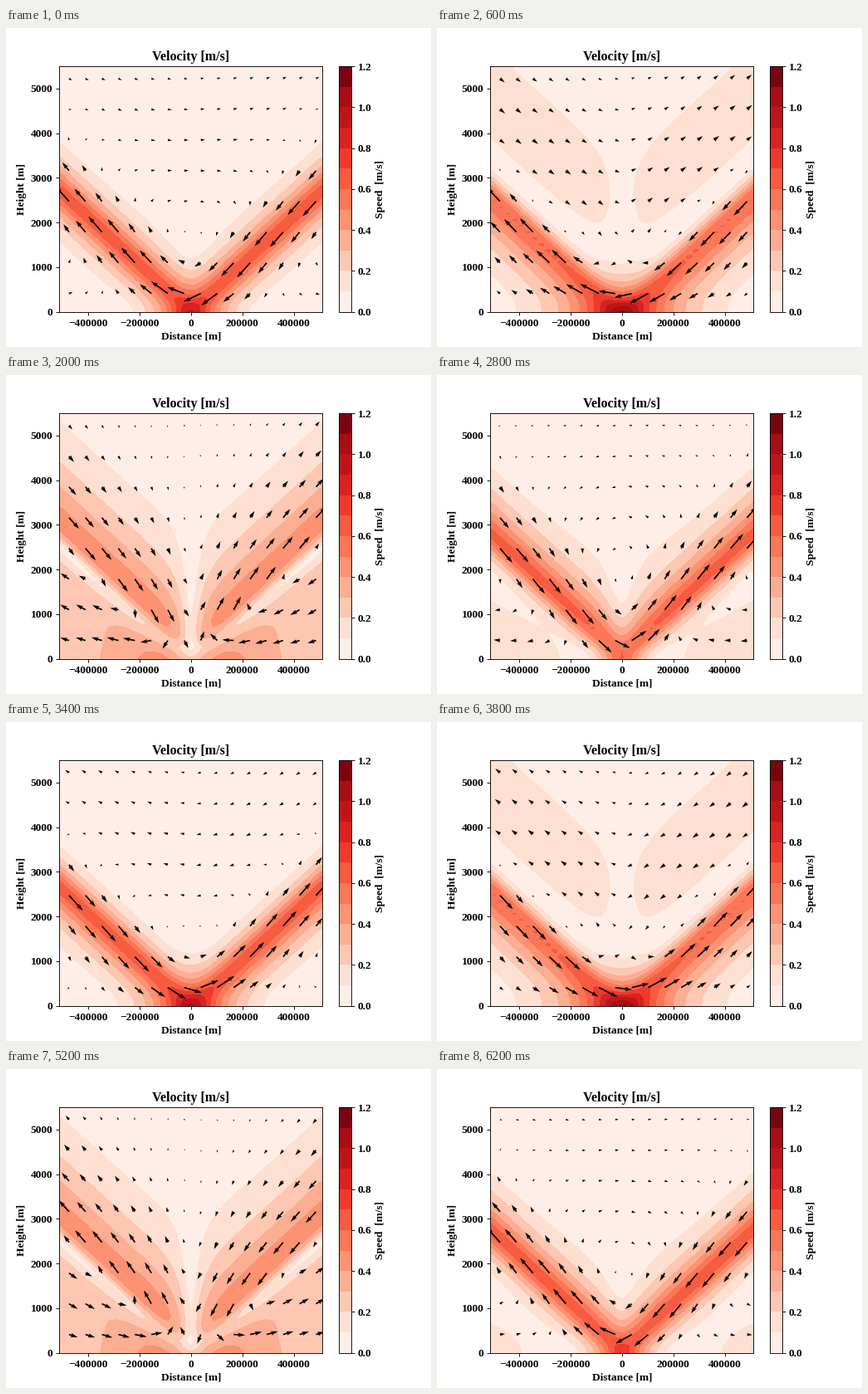
Recreate the animation shown at these times as a matplotlib script. Size 512 by 384 pixels, loop 6400 ms.

```python
import numpy as np
import matplotlib.pyplot as plt
from matplotlib.animation import FuncAnimation

plt.rcParams.update({
    "font.family": "Liberation Serif",
    "font.size": 12,
    "font.weight": "bold",
    "axes.titleweight": "bold",
    "axes.labelweight": "bold",
})

FRAMES = 32
OMEGA = 7.292e-5
CORIOLIS = 2 * OMEGA * np.sin(np.radians(20))
BUOYANCY = 0.01            # 1/s
DEPTH = 1500.0             # heating depth, m
COAST = 50e3               # coastal transition width, m
AMPLITUDE = 0.68           # m/s
LENGTH = BUOYANCY * DEPTH / np.sqrt(OMEGA**2 - CORIOLIS**2)
ARROW_POWER = 0.7          # lengthens weak components

x = np.linspace(-512e3, 512e3, 81)
z = np.linspace(0, 5500, 41)


def wave_modes():
    """Complex amplitudes of u and w for a diurnally heated coast."""
    dk = 0.02
    k = np.arange(dk / 2, 70, dk)
    xi, zeta = x / LENGTH, z / DEPTH
    weight = np.exp(-COAST / LENGTH * k) / (1 + k**2) * dk
    column = np.exp(1j * np.outer(zeta, k)) - np.exp(-zeta)[:, None]
    stream = -AMPLITUDE * (column * weight) @ np.cos(np.outer(k, xi))
    return np.gradient(stream, zeta, axis=0), -np.gradient(stream, xi, axis=1)


u_mode, w_mode = wave_modes()


def velocity(frame):
    phase = np.exp(2j * np.pi * frame / FRAMES)
    return (phase * u_mode).imag, (phase * w_mode).imag


levels = np.linspace(0, 1.2, 13)


def draw_speed(u, w):
    return ax.contourf(x, z, np.hypot(u, w), levels, cmap="Reds",
                       vmin=0, vmax=1.2)


def arrow(component):
    part = component[3::5, 3::5]
    return np.sign(part) * np.abs(part)**ARROW_POWER


fig, ax = plt.subplots(figsize=(6.4, 4.8), dpi=80)
u, w = velocity(0)
filled = draw_speed(u, w)
bar = fig.colorbar(filled, ax=ax, ticks=np.arange(0, 1.3, 0.2))
bar.ax.minorticks_off()
bar.set_label("Speed  [m/s]")
quiver = ax.quiver(x[3::5], z[3::5], arrow(u), arrow(w),
                   scale=10.5, zorder=2.2)

ax.set_title("Velocity [m/s]")
ax.set_xlabel("Distance [m]")
ax.set_ylabel("Height [m]")
ax.set_xticks(np.arange(-400000, 400001, 200000))
ax.set_yticks(np.arange(0, 5001, 1000))
ax.set_xlim(x[0], x[-1])
ax.set_ylim(z[0], z[-1])


def update(frame):
    global filled
    u, w = velocity(frame)
    filled.remove()
    filled = draw_speed(u, w)
    quiver.set_UVC(arrow(u), arrow(w))
    return filled, quiver


anim = FuncAnimation(fig, update, frames=FRAMES, interval=200,
                     init_func=lambda: update(0), repeat=True)
plt.show()
```
